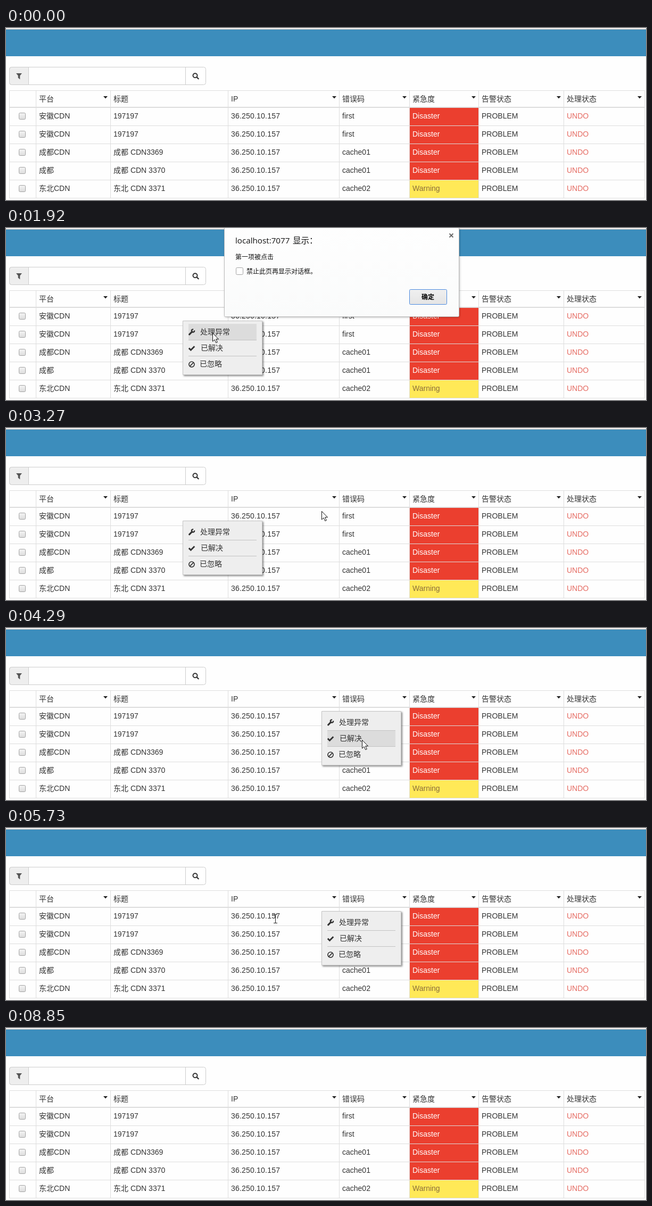
An HTML page with a canvas for the animation above (9150 ms loop, 1203 by 323 pixels).

```html
<!DOCTYPE html>
<html lang="zh-CN">
<head>
<meta charset="utf-8">
<title>告警列表</title>
<style>
  html, body { margin: 0; width: 100%; height: 100%; overflow: hidden; background: #fefefe; }
  canvas { display: block; }
</style>
</head>
<body>
<canvas id="stage" width="1203" height="323"></canvas>
<script>
const ctx = document.getElementById('stage').getContext('2d');
const LOOP = 9150, STEP = 30, ENTER = 210, LEAVE = 8850;
const CJK = '"Noto Sans CJK SC","Noto Sans CJK",sans-serif';
const ARIAL = '"Liberation Sans",' + CJK;

const COLUMNS = [
  { x: 6 },
  { x: 56, head: '平台', sort: true },
  { x: 196, head: '标题' },
  { x: 417, head: 'IP', sort: true },
  { x: 626, head: '错误码', sort: true },
  { x: 758, head: '紧急度', sort: true },
  { x: 888, head: '告警状态', sort: true },
  { x: 1048, head: '处理状态', sort: true },
  { x: 1200 }
];
const ROWS = [
  ['安徽CDN', '197197', 'first', 'Disaster'],
  ['安徽CDN', '197197', 'first', 'Disaster'],
  ['成都CDN', '成都 CDN3369', 'cache01', 'Disaster'],
  ['成都', '成都 CDN 3370', 'cache01', 'Disaster'],
  ['东北CDN', '东北 CDN 3371', 'cache02', 'Warning']
];
const ITEMS = [
  { label: '处理异常', icon: wrench, indent: 33 },
  { label: '已解决', icon: check, indent: 34 },
  { label: '已忽略', icon: ban, indent: 32 }
];

const linear = k => k;
const smooth = k => k * k * (3 - 2 * k);
const easeOut = k => 1 - (1 - k) ** 2;

// The pointer rests between moves; menus open where it rests.
const ENTRY = { x: 1192, y: 34 };
const MOVES = [
  { from: 210, to: 750, x: 332, y: 174, ease: easeOut },
  { from: 1230, to: 1500, x: 388, y: 197, ease: linear },
  { from: 1950, to: 2610, x: 789, y: 134, ease: smooth },
  { from: 2880, to: 3270, x: 593, y: 156, ease: smooth },
  { from: 3570, to: 3900, x: 669, y: 210, ease: smooth },
  { from: 4350, to: 4830, x: 779, y: 126, ease: smooth },
  { from: 5400, to: 5730, x: 506, y: 170, ease: smooth },
  { from: 6270, to: 6420, x: 574, y: 150, ease: smooth },
  { from: 7080, to: 7320, x: 541, y: 166, ease: linear },
  { from: 7320, to: 7530, x: 474, y: 176, ease: easeOut },
  { from: 7950, to: 8220, x: 655, y: 172, ease: smooth },
  { from: 8550, to: 8820, x: 1192, y: 73, ease: linear }
];
const MENUS = [
  { from: 960, to: 3420 },
  { from: 3420, to: 5940 },
  { from: 6510, to: 7650 },
  { from: 7890, to: 8400 }
];
const DIALOGS = [
  { from: 1770, press: 2700, to: 2790, item: 0, message: '第一项被点击' },
  { from: 4350, press: 5100, to: 5190, item: 1, message: '第二项被点击' }
];

function rect(x, y, w, h, color) {
  ctx.fillStyle = color;
  ctx.fillRect(x, y, w, h);
}

function text(str, x, y, color = '#333', font = '14px ' + ARIAL, spacing = 0) {
  ctx.font = font;
  ctx.letterSpacing = spacing + 'px';
  ctx.fillStyle = color;
  ctx.fillText(str, x, y);
}

function trace(points) {
  ctx.beginPath();
  points.forEach(([x, y]) => ctx.lineTo(x, y));
}

function poly(points, color) {
  trace(points);
  ctx.fillStyle = color;
  ctx.fill();
}

function line(points, color, width) {
  trace(points);
  ctx.strokeStyle = color;
  ctx.lineWidth = width;
  ctx.stroke();
}

function ring(x, y, r, color, width, a = 0, b = Math.PI * 2) {
  ctx.beginPath();
  ctx.arc(x, y, r, a, b);
  ctx.strokeStyle = color;
  ctx.lineWidth = width;
  ctx.stroke();
}

function box(x, y, w, h, r, fill, stroke) {
  ctx.beginPath();
  ctx.roundRect(x + .5, y + .5, w - 1, h - 1, r);
  ctx.fillStyle = fill;
  ctx.fill();
  ctx.strokeStyle = stroke;
  ctx.lineWidth = 1;
  ctx.stroke();
}

function vertical(y, h, top, bottom) {
  const g = ctx.createLinearGradient(0, y, 0, y + h);
  g.addColorStop(0, top);
  g.addColorStop(1, bottom);
  return g;
}

function at(x, y, draw) {
  ctx.save();
  ctx.translate(x, y);
  draw();
  ctx.restore();
}

function shadow(offset, blur, color, draw) {
  ctx.save();
  ctx.shadowOffsetX = ctx.shadowOffsetY = offset;
  ctx.shadowBlur = blur;
  ctx.shadowColor = color;
  draw();
  ctx.restore();
}

// Icons, centred on the origin
function wrench() {
  ctx.lineCap = 'round';
  line([[-4.3, 4.3], [.8, -.8]], '#333', 3.2);
  ctx.lineCap = 'butt';
  ring(2.5, -2.5, 2.6, '#333', 2.3, -.25, Math.PI * 1.5 + .25);
}

function check() {
  line([[-5.2, -.2], [-1.6, 3.4], [5.3, -3.6]], '#333', 2.9);
}

function ban() {
  ring(0, 0, 5.1, '#333', 1.7);
  line([[-3.5, 3.5], [3.5, -3.5]], '#333', 1.7);
}

function funnel() {
  poly([[-5.5, -5.5], [5.5, -5.5], [0, 1]], '#555');
  poly([[-1.8, -2], [1.8, -2], [1.8, 6], [-1.8, 3]], '#555');
}

function lens() {
  ring(-1.5, -1.3, 4, '#333', 2);
  line([[1.3, 1.5], [5.3, 5.5]], '#333', 2.4);
}

function searchBar() {
  box(6, 73, 370, 34, 4, '#fff', '#ccc');
  box(6, 73, 37, 34, [4, 0, 0, 4], '#eee', '#ccc');
  rect(337, 73, 1, 34, '#ccc');
  at(24.5, 90.5, funnel);
  at(357, 90.5, lens);
}

function checkbox(x, y, size, top, bottom) {
  box(x, y, size, size, 2, vertical(y, size, top, bottom), '#a2a2a2');
}

function table() {
  rect(759, 150, 129, 135, '#eb3f2f');
  rect(759, 286, 129, 33, '#ffe957');
  rect(6, 117, 1195, 1, '#ddd');
  rect(6, 148, 1195, 2, '#ddd');
  COLUMNS.forEach(({ x, head, sort }, i) => {
    rect(x, 117, 1, 203, '#ddd');
    if (head) text(head, x + 6, 138);
    const caret = sort && COLUMNS[i + 1].x - 9;
    if (sort) poly([[caret - 4, 128], [caret + 4, 128], [caret, 132.5]], '#222');
  });

  ROWS.forEach(([platform, title, code, level], i) => {
    const y = 170 + 34 * i;
    rect(6, y + 13, 1195, 1, '#ddd');
    checkbox(24, y - 11, 13, '#f4f4f4', '#dcdcdc');
    text(platform, 62, y);
    text(title, 202, y);
    text('36.250.10.157', 423, y, '#333', '14px ' + ARIAL, .2);
    text(code, 632, y);
    text(level, 764, y, level === 'Warning' ? '#8a6d3b' : '#fff');
    text('PROBLEM', 894, y);
    text('UNDO', 1054, y, '#e66b62');
  });
}

function page() {
  rect(0, 0, 1203, 323, '#fefefe');
  rect(0, 0, 1203, 2, '#f1f1f1');
  rect(0, 2, 1203, 1, '#b5b5b5');
  rect(0, 3, 1203, 50, '#3c8dbc');
  searchBar();
  table();
}

function contextMenu({ x, y }, hover) {
  shadow(2, 3, 'rgba(0,0,0,.45)', () => rect(x, y, 150, 102, '#eee'));
  box(x, y, 150, 102, 0, '#eee', '#c4c4c4');
  if (hover >= 0) rect(x + 11, y + 6 + 30 * hover, 128, 30, '#dcdcdc');
  ITEMS.forEach(({ label, icon, indent }, i) => {
    const mid = y + 21.5 + 30.3 * i;
    if (i) rect(x + 11, y + 6 + 30 * i, 128, 1, '#c3c3c3');
    at(x + 17, mid, icon);
    text(label, x + indent, Math.round(mid) + 4);
  });
}

function dialog({ message, press }, t) {
  const face = t < press ? ['#f0f0f0', '#e4e4e4'] : ['#d8d8d8', '#dfdfdf'];
  const small = '12px ' + CJK;
  shadow(1, 4, 'rgba(0,0,0,.4)', () => rect(411, 0, 440, 166, '#fff'));
  box(410, -4, 442, 171, 2, vertical(0, 166, '#fefefe', '#fafbfb'), '#bdbdbd');
  text('localhost:7077', 431, 29, '#111', '15.2px "Open Sans",sans-serif');
  text('显示：', 539, 29, '#111', '15.5px "Noto Sans CJK TC",' + CJK);
  line([[833.5, 10.5], [840.5, 17.5]], '#666', 1.8);
  line([[840.5, 10.5], [833.5, 17.5]], '#666', 1.8);
  text(message, 431, 59, '#111', small);
  checkbox(432, 74, 14, '#fff', '#fff');
  text('禁止此页再显示对话框。', 452, 86, '#111', small);
  box(758, 115, 71, 29, 2, vertical(115, 29, ...face), '#4a8ae0');
  text('确定', 781, 134, '#000', 'bold ' + small);
}

function arrow() {
  const shape = [[0, 0], [0, 15.5], [3.6, 12.2], [6.2, 18], [8.8, 17], [6.2, 11.2], [11, 11.2]];
  poly(shape, '#fff');
  line([...shape, shape[0], shape[1]], '#111', 1);
}

function beam() {
  line([[0, -8], [0, 8]], '#222', 1);
  for (const y of [-8, 8]) line([[-3.5, y], [3.5, y]], '#222', 1);
}

function pointer(t) {
  let { x, y } = ENTRY;
  for (const m of MOVES) {
    if (t < m.from) break;
    const k = m.ease(Math.min(1, (t - m.from) / (m.to - m.from)));
    x += (m.x - x) * k;
    y += (m.y - y) * k;
  }
  return { x: Math.round(x), y: Math.round(y) };
}

function hovered(menu, p) {
  const row = Math.floor((p.y - menu.y - 6) / 30);
  const inside = p.x >= menu.x + 11 && p.x < menu.x + 139 && row >= 0 && row < ITEMS.length;
  return inside ? row : -1;
}

function render(t) {
  const active = o => t >= o.from && t < o.to;
  const p = pointer(t), menu = MENUS.find(active), open = DIALOGS.find(active);
  page();
  if (menu) {
    const corner = pointer(menu.from);
    contextMenu(corner, open ? open.item : hovered(corner, p));
  }
  if (open) dialog(open, t);
  if (t < ENTER || t >= LEAVE) return;
  const overIp = !open && p.x > 423 && p.x < 515 && p.y > 155 && p.y < 175;
  at(p.x + .5, p.y + .5, overIp ? beam : arrow);
}

const start = performance.now();
function frame() {
  const t = (performance.now() - start) % LOOP;
  render(Math.floor(t / STEP) * STEP);
  requestAnimationFrame(frame);
}
frame();
</script>
</body>
</html>
```
